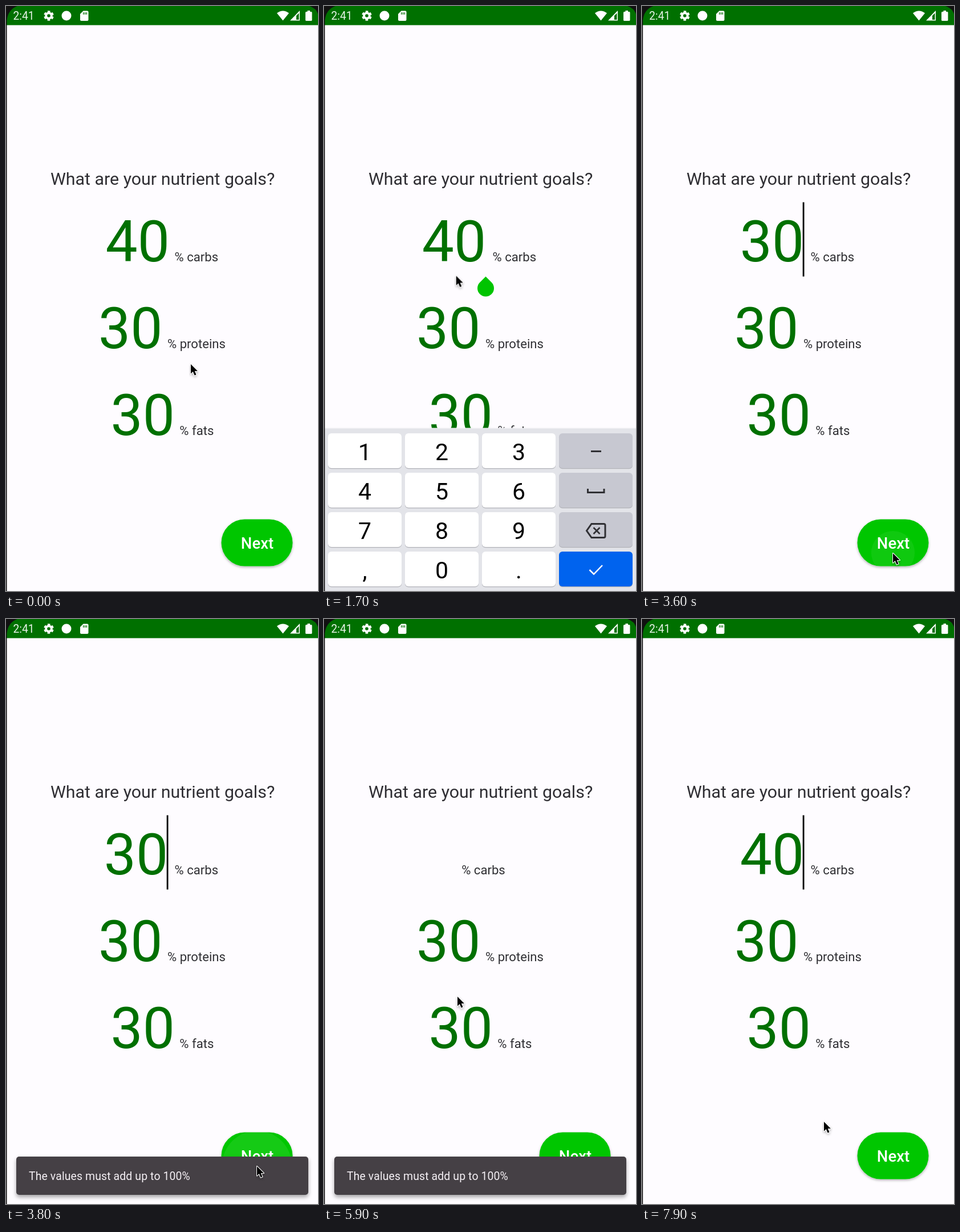
An HTML page for the animation above (8000 ms loop, 547 by 1024 pixels).

```html
<!DOCTYPE html>
<html lang="en">
<head>
<meta charset="utf-8">
<title>Nutrient goals</title>
<style>
html, body { margin: 0; width: 100%; height: 100%; overflow: hidden; background: #fefcff; }
svg { display: block; width: 547px; height: 1024px; font-family: Roboto, sans-serif; }
.big { font-size: 100px; fill: #007000; }
.label { font-size: 22.1px; fill: #303034; }
.key { font-size: 41px; text-anchor: middle; fill: #000; }
.icon { fill: none; stroke: #303034; stroke-width: 3; }

/* Loop of 8 s: 1.25% is 100 ms */
.run { animation: 8s step-end infinite; }
#digits { animation-name: digits; }
#carbs { animation-name: carbs; }
#four { animation-name: four; }
#three { animation-name: three; }
#zero { animation-name: zero; }
#caret { animation-name: caret; }
#handle { animation-name: handle; }
#keyboard { animation-name: keyboard; }
#ripple { animation-name: ripple; animation-timing-function: linear; }
#snackbar { animation-name: snackbar; transform-origin: 274px 975px; }
#pointer { animation-name: move, show; }

@keyframes digits {
  0% { translate: 0 }
  12.5%, 33.75%, 86.25%, 100% { translate: -2.7px }
  26.25%, 71.25% { translate: 25.3px }
}
@keyframes carbs {
  0%, 33.75%, 86.25%, 100% { translate: 0 }
  26.25%, 31.25%, 71.25%, 82.5% { translate: -28px }
  28.75%, 73.75% { translate: -54.3px }
}
@keyframes four {
  0%, 82.5%, 100% { opacity: 1 }
  28.75% { opacity: 0 }
}
@keyframes three {
  0%, 73.75%, 100% { opacity: 0 }
  31.25% { opacity: 1 }
}
@keyframes zero {
  0%, 33.75%, 86.25%, 100% { opacity: 1 }
  26.25%, 71.25% { opacity: 0 }
}
@keyframes caret {
  0%, 18.75%, 26.25%, 51.25%, 65% { opacity: 0 }
  12.5%, 25%, 43.75%, 57.5%, 95%, 100% { opacity: 1 }
}
@keyframes handle {
  0%, 26.25%, 100% { opacity: 0 }
  12.5% { opacity: 1 }
}
@keyframes keyboard {
  0%, 43.75%, 100% { translate: 0 290px }
  12.5% { translate: 0 110px }
  13.75% { translate: 0 24px }
  15% { translate: 0 3px }
  16.25% { translate: 0 0 }
  40% { translate: 0 20px }
  41.25% { translate: 0 130px }
  42.5% { translate: 0 250px }
}
@keyframes ripple {
  0%, 44.9% { r: 30px; opacity: 0 }
  45% { r: 38px; opacity: .06 }
  49% { r: 75px; opacity: .1 }
  53%, 100% { r: 75px; opacity: 0 }
}
@keyframes snackbar {
  0%, 91.25%, 100% { opacity: 0; scale: 1 }
  46.25% { opacity: .5; scale: .92 }
  47.5% { opacity: 1; scale: 1 }
  90% { opacity: .5; scale: 1 }
}
@keyframes move {
  0% { translate: 324px 627px; animation-timing-function: steps(9) }
  11.25% { translate: 284px 427px }
  13.75% { translate: 284px 427px; animation-timing-function: steps(7) }
  22.5% { translate: 223px 480px }
  23.75% { translate: 478px 830px }
  38.75% { translate: 472px 976px; animation-timing-function: steps(4) }
  43.75% { translate: 440px 958px }
  48.75% { translate: 440px 958px; animation-timing-function: steps(7) }
  57.5% { translate: 258px 862px; animation-timing-function: steps(2) }
  60% { translate: 210px 557px }
  61.25% { translate: 210px 437px }
  70% { translate: 210px 437px; animation-timing-function: steps(3) }
  73.75% { translate: 234px 661px }
  90% { translate: 234px 661px; animation-timing-function: steps(7) }
  98.75%, 100% { translate: 319px 880px }
}
@keyframes show {
  0%, 38.75%, 90%, 100% { opacity: 1 }
  31.25%, 82.5% { opacity: 0 }
}
</style>
</head>
<body>
<svg viewBox="0 0 547 1024">
  <defs>
    <clipPath id="pill"><rect x="377.5" y="898.5" width="125" height="82" rx="41"/></clipPath>
    <filter id="soft" x="-20%" y="-20%" width="140%" height="150%">
      <feDropShadow dx="0" dy="2" stdDeviation="2" flood-opacity=".3"/>
    </filter>
    <filter id="lift" x="-5%" y="-20%" width="110%" height="160%">
      <feDropShadow dx="0" dy="4" stdDeviation="3.5" flood-opacity=".35"/>
    </filter>
  </defs>
  <rect width="547" height="1024" fill="#fefcff"/>

  <g id="status" fill="#fff">
    <rect width="547" height="33.5" fill="#007000"/>
    <text x="12.5" y="24" font-size="19.3" fill="#e8f3e8">2:41</text>
    <g fill="none" stroke="#fff">
      <circle cx="75" cy="17" r="4.8" stroke-width="4"/>
      <circle cx="75" cy="17" r="7.3" stroke-width="3" stroke-dasharray="4.4 3.24" stroke-dashoffset="-1.6"/>
    </g>
    <circle cx="106" cy="17" r="8.5"/>
    <path d="M135.5 8.5H142.5Q144.5 8.5 144.5 10.5V24Q144.5 26 142.5 26H132Q130 26 130 24V14z"/>
    <path d="M135.8 11v4M138.6 11v4M141.4 11v4" stroke="#007000" stroke-width="1.3"/>
    <path d="M475 12.5Q485.500 4.500 496 12.500L485.500 25.500z"/>
    <path d="M515 8V25.500H498z"/>
    <path d="M513.500 12.500V24H509V17z" fill="#007000"/>
    <path d="M528.500 8H533V10H535Q536.500 10 536.500 11.500V24.500Q536.500 26 535 26H526.500Q525 26 525 24.500V11.500Q525 10 526.500 10H528.500z"/>
  </g>

  <text x="274.600" y="313" text-anchor="middle" font-size="30.350" fill="#2f2e33">What are your nutrient goals?</text>

  <g id="digits" class="run big">
    <text id="four" class="run" x="174.5" y="447">4</text>
    <text id="three" class="run" x="174.5" y="447">3</text>
    <text id="zero" class="run" x="230.65" y="447">0</text>
  </g>
  <text id="carbs" class="run label" x="295.5" y="447">% carbs</text>
  <text class="big" x="162" y="599">30</text>
  <text class="label" x="283" y="599">% proteins</text>
  <text class="big" x="183.500" y="751">30</text>
  <text class="label" x="304.300" y="751">% fats</text>
  <rect id="caret" class="run" x="281.700" y="343.500" width="2.800" height="130"/>
  <path id="handle" class="run" d="M283.500 473.500l10.250 10.250a14.500 14.500 0 1 1-20.500 0z" fill="#00c400"/>

  <rect x="377.5" y="898.5" width="125" height="82" rx="41" fill="#00c600" filter="url(#soft)"/>
  <g clip-path="url(#pill)"><circle id="ripple" class="run" cx="440" cy="957" r="30" fill="#fff"/></g>
  <text x="440.500" y="950" text-anchor="middle" font-size="27.500" font-weight="500" fill="#fff">Next</text>

  <g id="keyboard" class="run">
    <rect y="738.500" width="547" height="2" fill="#eeeef2"/>
    <rect y="740" width="547" height="284" fill="#e3e4e9"/>
    <g id="keys"></g>
    <g class="icon">
      <path d="M468 779.500H486"/>
      <path d="M462.500 845V851.500H491V845"/>
      <path d="M469 906.500H490.500Q493 906.500 493 909V928Q493 930.500 490.500 930.500H469L460.500 918.500z"/>
      <path d="M472.500 913l11 11M483.500 913l-11 11" stroke-width="2.600"/>
      <path d="M465.500 987l7.500 7.500L488 979" stroke="#fff" stroke-width="2.500"/>
    </g>
  </g>

  <g id="snackbar" class="run">
    <rect x="18" y="941" width="512" height="67" rx="5" fill="#444144" filter="url(#lift)"/>
    <text x="40" y="982" font-size="19.400" letter-spacing=".13" fill="#f5f0f5">The values must add up to 100%</text>
  </g>

  <path d="M0 0H20Q3.500 6 1.500 25V1024H0zM532 0Q544 4 547 14V0z" fill="#111"/>
  <path id="pointer" class="run" d="M0 0V16.500L3.800 13L6.600 19.500L9.500 18.300L6.800 12H12z"
    stroke="#fff" stroke-width="2" paint-order="stroke" stroke-linejoin="round" filter="url(#soft)"/>
</svg>
<script>
const keys = document.getElementById("keys");

function add(tag, attributes, text = "") {
  const node = document.createElementNS("http://www.w3.org/2000/svg", tag);
  for (const [name, value] of Object.entries(attributes)) node.setAttribute(name, value);
  node.textContent = text;
  keys.append(node);
}

["123 ", "456 ", "789 ", ",0. "].forEach((row, r) => {
  [...row].forEach((char, c) => {
    const x = 7 + 135 * c, y = 748 + 69 * r;
    const fill = c < 3 ? "#fff" : r < 3 ? "#c7c8d1" : "#0063ee";
    const box = { x, width: 129, height: 61, rx: 6 };
    add("rect", { ...box, y: y + 1.3, fill: "#b2b3b9" });
    add("rect", { ...box, y, fill });
    if (c < 3) add("text", { x: x + 64.5, y: y + 47, class: "key" }, char);
  });
});
</script>
</body>
</html>
```
